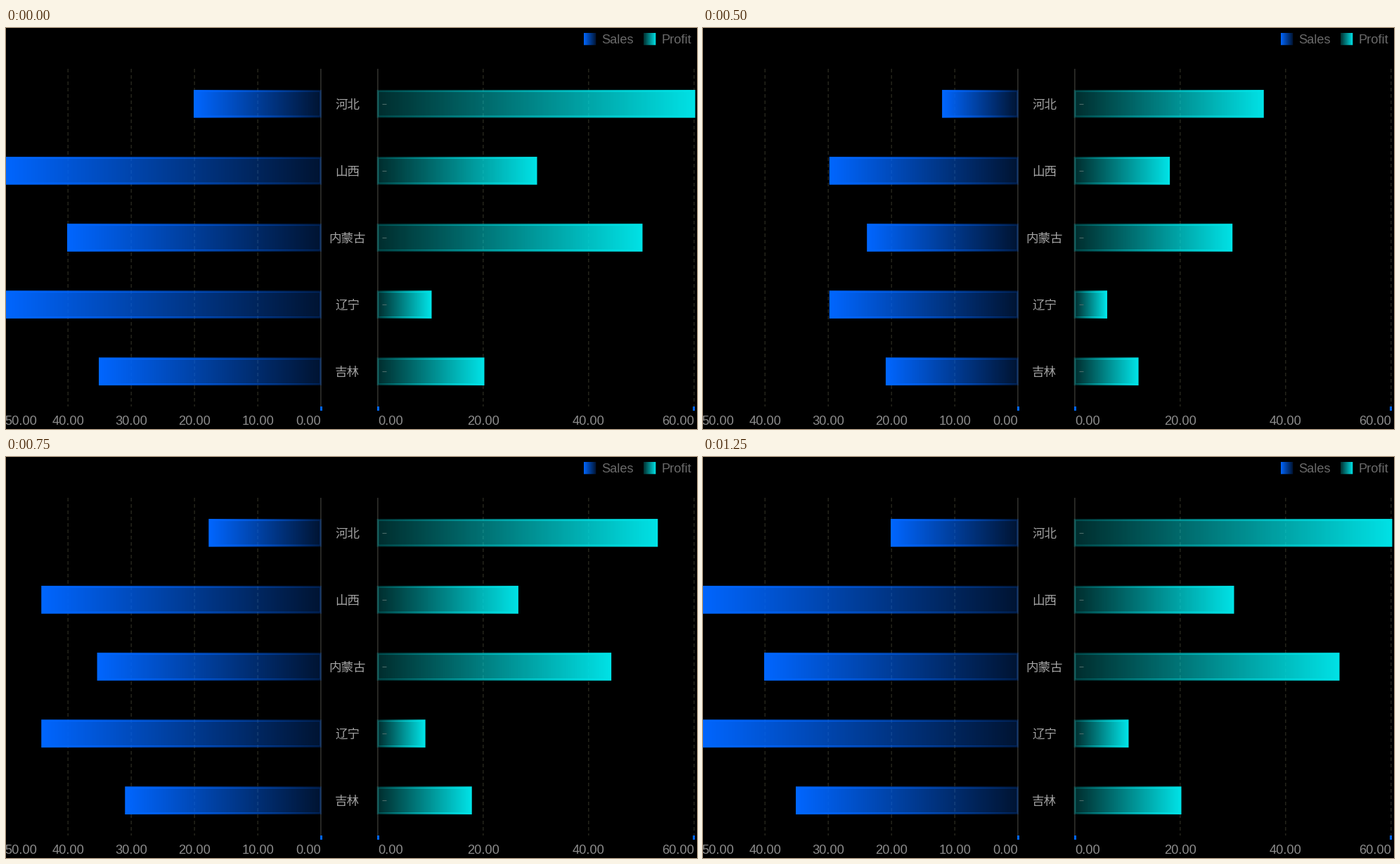
A matplotlib script that plays this animation: 983x570 px, repeating every 2.41 s.

```python
import matplotlib.pyplot as plt
import numpy as np
from matplotlib.animation import FuncAnimation
from matplotlib.patches import Rectangle

W, H, DPI = 983, 570, 64
PX = 72 / DPI                      # points per pixel
LOOP, TICK = 2410, 10              # ms
STEP = 1000 / 12                   # the bars move twelve times a second

BLUE, TEAL = (0, 102, 255), (0, 226, 230)
LEFT, RIGHT = 448.5, 529.0         # zero points of the two scales
ROOT = 447.5                       # where the left bars end
TOP, BOTTOM = 58, 538
BAR_H, EDGE = 36.7, 1.5            # bar height, half of the outline width
ROWS = [
    ("河北", 20, 60),
    ("山西", 50, 30),
    ("内蒙古", 40, 50),
    ("辽宁", 50, 10),
    ("吉林", 35, 20),
]


def row_y(i):
    return 107.8 + 95.1 * i


def cover(lo, hi, n):
    """Share of each of n pixels that lies between lo and hi."""
    i = np.arange(n)
    return np.clip(np.minimum(hi, i + 1) - np.maximum(lo, i), 0, 1)


def box(x0, x1, y0, y1):
    return np.outer(cover(y0, y1, H), cover(x0, x1, W))


def paint(alpha, root, tip, y0, y1, edge=EDGE):
    """Add an outlined bar that fades from its tip to its root."""
    x0, x1 = sorted((root, tip))
    along = (np.arange(W) + 0.5 - root) / (tip - root)
    fade = 0.2 + 0.8 * np.clip(along, 0, 1)
    fill = box(x0, x1, y0, y1)
    outer = box(x0 - edge, x1 + edge, y0 - edge, y1 + edge)
    inner = box(x0 + edge, x1 - edge, y0 + edge, y1 - edge)
    layer = 1 - (1 - fill * fade) * (1 - (outer - inner) * fade)
    np.maximum(alpha, layer, out=alpha)


def growth(ms):
    """Bar length as a share of the full value."""
    step = int((ms + 5) // STEP)
    if step < 4:
        return 1.0
    x = np.interp(step, [4, 6, 11, 15], [0.076, 0.2595, 0.6755, 1])
    return 1 - (1 - x) ** 3


def bars(share):
    alpha = legend.copy()
    for i, (_, sales, profit) in enumerate(ROWS):
        y0, y1 = row_y(i) - BAR_H / 2, row_y(i) + BAR_H / 2
        paint(alpha, ROOT, LEFT - 9 * sales * share, y0, y1)
        paint(alpha, RIGHT, RIGHT + 7.5 * profit * share, y0, y1)
    rgba = canvas.copy()
    rgba[..., 3] = np.round(alpha * 255)
    return rgba


fig = plt.figure(figsize=(W / DPI, H / DPI), dpi=DPI, facecolor="black")
ax = fig.add_axes([0, 0, 1, 1])

canvas = np.zeros((H, W, 4), np.uint8)
canvas[..., :3] = TEAL
canvas[:, :490, :3] = BLUE
canvas[:40, :880, :3] = BLUE

legend = np.zeros((H, W))
paint(legend, 839.3, 822, 7, 24.3, edge=0)
paint(legend, 907, 924.3, 7, 24.3, edge=0)

image = ax.imshow(canvas, extent=(0, W, H, 0), aspect="auto",
                  interpolation="nearest", zorder=2)
ax.set_xlim(0, W)
ax.set_ylim(H, 0)
ax.axis("off")


def vline(x, color, width, style="-"):
    ax.plot([x, x], [TOP, BOTTOM], color=color, lw=width * PX, ls=style,
            solid_capstyle="butt", dash_capstyle="butt", snap=False, zorder=1)


def label(x, y, text, size, color, ha="center", font="Liberation Sans", **kw):
    ax.text(x, y, text, fontsize=size * PX, color=color, ha=ha,
            va="baseline", family=font, zorder=4, **kw)


# grid and axes
for x in [88.2, 178.2, 268.2, 358.2, 678.8, 828.8, 978.8]:
    vline(x, "#25251c", 1.5, (0, (3.4, 2.6)))
for x in [447.9, 528.9]:
    vline(x, "#343430", 1.5)
for x in [448, 529.2, 978.7]:
    ax.add_patch(Rectangle((x - 1.5, BOTTOM), 3, 6, color="#0066ff", lw=0,
                           zorder=3))

# axis values
GREY = "#8c8c8c"
label(44.5, 564, "50.00", 18.3, GREY, "right")
for i in range(4):
    label(88.2 + 90 * i, 564, f"{40 - 10 * i}.00", 18.3, GREY)
label(448, 564, "0.00", 18.3, GREY, "right")
label(529, 564, "0.00", 18.3, GREY, "left")
label(679, 564, "20.00", 18.3, GREY)
label(829, 564, "40.00", 18.3, GREY)
label(979, 564, "60.00", 18.3, GREY, "right")

# row names, with a short tick inside the right-hand bars
for i, (name, _, _) in enumerate(ROWS):
    y = row_y(i)
    label(485.6, y + 7, name, 17.5, "#a4a4a4", font="Noto Sans CJK JP",
          weight="light")
    ax.plot([535, 540.5], [y - 0.3, y - 0.3], color="#4c6c6a", lw=1.1 * PX,
            solid_capstyle="butt", zorder=3)

label(847, 22, "Sales", 18.2, "#6a6a6a", "left")
label(932, 22, "Profit", 18.2, "#6a6a6a", "left")

cache = {}


def update(n):
    share = growth(n * TICK)
    if share not in cache:
        cache[share] = bars(share)
    image.set_data(cache[share])
    return [image]


anim = FuncAnimation(fig, update, frames=LOOP // TICK, interval=TICK,
                     repeat=True, repeat_delay=0, blit=False)
plt.show()
```
